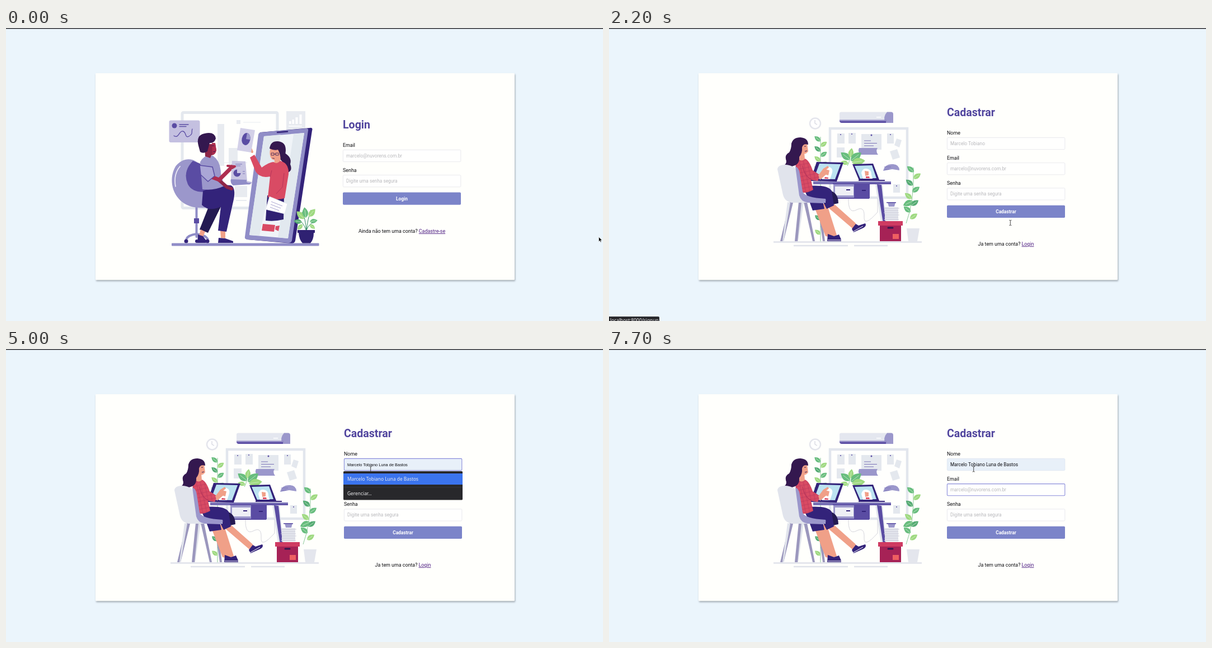
An HTML page that plays this animation: 1067x525 px, repeating every 8000 ms.

```html
<!DOCTYPE html>
<html lang="pt-BR">
<head>
<meta charset="utf-8">
<title>Login</title>
<style>
html, body { margin: 0; width: 100%; height: 100%; overflow: hidden; background: #ebf5fc; }
svg { display: block; }
text { font-family: Roboto, sans-serif; font-size: 8.89px; fill: #0c0c10; white-space: pre; }
.title { font-size: 19.56px; font-weight: 700; fill: #51459e; }
.input { font-size: 8.34px; }
.hint { font-size: 8.34px; fill: #b8b8bc; }
.action { font-size: 8.34px; font-weight: 700; fill: #fff; }
.link { fill: #4b1a80; text-decoration: underline; }
.box { fill: #fffffe; stroke: #e4e4ea; stroke-width: .8; }
.box.filled { fill: #e8f0f9; stroke: #dbe4f0; }
.box.focus { stroke: #8a8ddb; stroke-width: 1.1; }
.preview { font-family: "Liberation Sans", Arial, sans-serif; font-size: 7.41px; }
.menu text, #status text { font-family: "Noto Sans", sans-serif; font-size: 8.37px; fill: #ececee; }
.card { fill: #fffffc; filter: drop-shadow(1px 2px 1.5px rgba(30, 40, 50, .38)); }
.round { stroke-linecap: round; stroke-linejoin: round; }
</style>
</head>
<body>
<svg width="1067" height="525" viewBox="0 0 1067 525">
  <defs>
    <pattern id="plaid" width="7" height="7" patternUnits="userSpaceOnUse" patternTransform="rotate(-12)">
      <path fill="#d94b64" d="M0 0h7v7H0z"/><path stroke="#b8355a" stroke-width=".7" d="M0 3h7M3 0v7"/>
    </pattern>
  </defs>
  <path fill="#ebf5fc" d="M0 0h1067v525H0z"/>
  <path fill="#2b2b30" d="M0 0h1067v1.5H0z"/>
  <rect class="card" x="160" y="81" width="749" height="370.5" rx="1"/>

  <g id="login">
    <!-- wall board and charts -->
    <rect x="315" y="151.500" width="170" height="171" rx="2" fill="#fffffd" stroke="#e4e8ee" stroke-width="5"/>
    <path fill="#e8ebf0" d="M378 172h12v75h-12zM409 283h22v20h-22zM411 308h19v2h-19zM412 165h7v7h-7zM424 168.500h31v1h-31zM316 241h115v1H316zM398 215h16v40h-16zM501 149h34v42h-34z"/>
    <path fill="#fff" d="M506 167h3.500v5H506zM511.500 164h3.500v8h-3.500zM517.500 160h4v12h-4zM524.500 155h4v17h-4zM505 175h24v1.500h-24z"/>
    <rect x="291.500" y="165.500" width="55" height="39.500" rx="3" fill="#c4c0e0"/>
    <circle cx="301" cy="175" r="4.500" fill="#5a4ca3"/>
    <path class="round" fill="none" stroke="#5a4ca3" stroke-width="1.300" d="M310 173h16M310 176.500h12M300 193c9 6 9-9 16-8s3 13 11 9 4-9 6-13"/>
    <!-- phone -->
    <path fill="#33237a" d="M454 187 543 179Q549 178 547 184L517 381Q516 386 510 386L432 379Z"/>
    <path fill="#908dc7" d="M456 187 537 180Q541 180 540 184L511 381Q510 385 505 385L431 379Q426 378 427 374L451 191Q452 187 456 187Z"/>
    <path fill="#f0f4f8" d="m461 194 72-6-29 189-69-6z"/>
    <path fill="#e2e9ef" d="m461 194 30-3-38 181-18-1zM514 190l19-2-29 189-18-2z"/>
    <path class="round" stroke="#33237a" stroke-width="2.500" d="m485 187 18-1.500"/>
    <path fill="#d94b64" d="m459 351 22 2-2 12-22-2zm23 4 7-1-2 10-6-3z"/>
    <!-- caller -->
    <path fill="#34184f" d="M494 222q18 8 14 22 6 15-10 16 3-14-8-25z"/>
    <path fill="#2f2172" d="M467 300h30l-1 43q-16 4-32 2z"/>
    <path fill="#f0a088" d="M473 214q-4 14 2 21l5 2-1 7 11-2 2-25z"/>
    <path fill="#d94b64" d="M478 240q6 5 12-2 16 4 15 24l-7 43q-16 5-30-2l4-37q-18 4-26-9l-10-25 8-5 13 23q14-10 21-10z"/>
    <path fill="none" stroke="#b8355a" d="m475 255-3 12M497 260l-3 25-11 12"/>
    <path class="round" fill="none" stroke="#f0a088" stroke-width="4" d="m440 222-4-9"/>
    <path fill="#34184f" d="M471 216q2-14 15-13 14 1 14 16 0 13-9 17-1-12-5-18-7 2-15-2z"/>
    <path fill="none" stroke="#34184f" stroke-width=".8" d="M474 224h5v4h-5zm8 0h5v4h-5zm-3 2h3m-6 7 4 1"/>
    <path fill="#fff" stroke="#dfe3ec" stroke-width=".7" d="m471 302 32 13-5 18-34-8z"/>
    <path stroke="#a9a5cf" d="m474 311 20 8m-21-3 18 7m-19-2 16 6"/>
    <!-- papers -->
    <path fill="#d3d0e8" d="m419 179 26 4-7 40-25-4z"/>
    <ellipse cx="429" cy="199" rx="7.500" ry="11" transform="rotate(12 429 199)" fill="#5a4ca3"/>
    <path fill="#9b97cb" d="m429 199 2-11q7 3 5 12z"/>
    <!-- office chair -->
    <path class="round" fill="none" stroke="#8f8cc6" stroke-width="4" d="M340.500 322v52m-18 4q3-7 18-9 16 2 20 9"/>
    <path fill="#5a4ca3" d="M336 341h9v9h-9z"/>
    <g fill="#33237a"><circle cx="322" cy="382" r="3.500"/><circle cx="341" cy="382" r="3"/><circle cx="360" cy="382" r="3.500"/></g>
    <path fill="#9b97cb" d="M303 248C318 228 344 232 352 256L362 300Q400 300 396 312 385 324 345 322C300 320 287 275 303 248Z"/>
    <path fill="#5a4ca3" d="M334 238q-19 20-9 42 9 17 37 13l-10-48z"/>
    <path class="round" fill="none" stroke="#edecf7" stroke-width="1.700" d="M303 284q-4-22 8-36"/>
    <!-- seated man -->
    <path fill="#241a52" d="m365 313 24-3-28 57-15-6z"/>
    <path fill="#f0a088" d="m348 361 8 4-4 9-7-2zM383 362l9 1v14l-8-1z"/>
    <path fill="#33237a" d="m343 370 9 3 6 8-1 4h-15zM380 376l12 1 14 5v3h-27zM352 292q34-13 50-10 9 4 5 25l-13 58-15-2 5-43q-21 10-34-3z"/>
    <path fill="#9b97cb" d="M347 240q8-15 23-11 14 10 14 32l6 22q-19 9-39 6z"/>
    <path fill="none" stroke="#8e2547" stroke-width="6" class="round" d="m380 272 15 13 8 3"/>
    <path class="round" fill="none" stroke="#ae2d4f" stroke-width="7" d="m360 264 21 8 24-24"/>
    <path fill="#aaa6d6" stroke="#5a4ca3" stroke-width="1.500" d="m346 246 23 3 4 16-12 10-13-12z"/>
    <path fill="#c8c5e2" d="m404 238 24 1 3 35 9 2q-2 6-9 4l-26-1q-5-4-3-8z"/>
    <path fill="#908dc7" d="m402 271 28 1q-2 7 8 5l-2 3-30 2q-6-4-4-11z"/>
    <circle cx="413" cy="260" r="6.500" fill="#5a4ca3"/><path fill="#c8c5e2" d="M413 260v-7q7 1 7 7z"/>
    <path stroke="#7d76b8" d="M410 244h12m-11 3h8m4 10h4m-4 4h4"/>
    <path class="round" fill="none" stroke="#ae2d4f" stroke-width="4" d="m396 247 13 1-5 3"/>
    <path fill="#8e2547" d="M355 208h19l2 11q-2 9-9 9l-2 5-9-3z"/>
    <path fill="#ae2d4f" d="M368 206h6l2 13q-2 8-7 8z"/>
    <path fill="#34184f" d="M344 211q-5-19 11-22 18-4 20 9-3 9-11 8l-4 15q-7 5-13 1z"/>
    <path stroke="#34184f" d="M368 211h4m-2 11 4-1"/>
    <!-- floor and plant -->
    <rect x="296" y="385.500" width="263.500" height="5" rx="1" fill="#908dc7"/>
    <path fill="none" stroke="#2f8a62" d="M537 364q-2-25-8-34m8 34q2-22 8-38m-8 38q-6-18-16-21m16 19q5-12 14-14"/>
    <g id="potLeaves"></g>
    <path fill="#2f2172" d="M521 362h31v5h-2q0 12-6 18.500h-14q-6-6-7-18.500h-2z"/>
  </g>

  <g id="signup">
    <!-- air conditioner, clock, board -->
    <rect x="412" y="150.500" width="95" height="19" rx="3" fill="#e4e7ef"/>
    <path fill="#9b97cb" d="M497 150.500h7q4 0 4 4V170h-14q-5-11 3-19.500z"/>
    <path fill="#8f88c4" d="M412 164.500h84v3h-84z"/><path fill="#5a4ca3" d="M412 167h83v3h-79q-3 0-4-3z"/><path fill="#fff" d="M478 159h8v1.500h-8z"/>
    <circle cx="368.500" cy="171" r="9.500" fill="#fff" stroke="#e4e5ec" stroke-width="2.500"/>
    <path fill="none" stroke="#c9cad6" d="M368 165v6l4 2"/>
    <rect x="395" y="180" width="138" height="124" fill="#fffffd" stroke="#e2e6ed" stroke-width="4.500"/>
    <path fill="#e4e8ee" d="M408 189h13v18h-13zM428 188h13v19h-13zM451 190h36v28h-36zM497 189h12v18h-12zM514 198l9 3-4 13-9-4zM502 221l13-4 5 15-13 4zM508 280h12v15h-12zM407 214h14v18h-14z"/>
    <path fill="#9b97cb" d="M447 215h33q-4 6 1 12h-32q-5-5-2-12zM490 256q3-13 18-12 11 1 11 11l-13-2z"/>
    <path stroke="#7a72b6" d="M456 202h12m-12 4.500h23m-23 4.500h17M492 249h12m-11 4h8"/>
    <g fill="#5a4ca3"><circle cx="414" cy="191" r="1"/><circle cx="434" cy="190" r="1"/><circle cx="469" cy="192" r="1.500"/><circle cx="503" cy="191" r="1"/><circle cx="514" cy="283" r="1"/></g>
    <!-- plants -->
    <path fill="none" stroke="#6fba80" stroke-width=".8" d="M378 383V195M531 350q15-40 13-100M426 247q6-10 4-25"/>
    <g id="vineLeaves"></g>
    <!-- desk -->
    <path fill="none" stroke="#b9b9c6" stroke-width=".6" d="M428 304q-1 30 14 22t14 12 24-8V304"/>
    <path fill="#9b97cb" d="M401 280h39v24h-39z"/><path fill="#5a4ca3" d="M438 280h28v25h-28zM404 304h61v2h-61z"/>
    <path fill="#eeeff5" d="M404 284h33v16h-33z"/><path stroke="#33237a" stroke-width="2" d="M424 290h7m21 1h7"/>
    <path fill="#e2e5ed" d="m476 280 13 1 10 101h-8z"/><path fill="#5a4ca3" d="m479 280 8 1 11 101h-3z"/>
    <path fill="#7770b5" d="M365 275h139v5H365z"/><path fill="#5a4ca3" d="M400 278h104v2H400z"/>
    <path fill="#33237a" d="m371 240 48 1-12 34-47-1zM435 244l37-1 11 29-36 1zM446 272h47v2h-47z"/>
    <path fill="#bce3f1" d="m376 243 38 1-10 27-38-1zM439 247l31-1 8 23-29 1z"/>
    <g fill="#fff"><path d="m374 262 6 8h-8zM382 258q3-10 12-9 8 3 4 13l-3 9h-14zM451 260q2-9 9-8 9 1 9 11l2 7h-17z"/></g>
    <path fill="#f0a088" d="m386 253 8 2-2 9-7-2zM457 256l7 1v7l-6 1z"/>
    <path fill="#d94b64" d="m386 267 6 1v2h-7zM459 266h6l1 3h-7z"/>
    <!-- box, stack, bin -->
    <path fill="#9b97cb" d="M498 312h14l-2 8h-10z"/><path fill="#5a4ca3" d="M496 312h17v1.500h-17z"/>
    <path fill="#e4e6ed" d="M493 321h24v24h-24zM532 359h23l-4 23h-16z"/>
    <path stroke="#c4c4d2" stroke-width=".8" d="M492 323h27m-26 4h24m-26 4h27m-25 4h26m-27 4h25m-26 4h27"/>
    <path fill="#a62256" d="M484 352h38v30h-38z"/><path fill="#cf3b62" d="M481 346h44v8h-44z"/>
    <path class="round" stroke="#33174f" stroke-width="3" d="M499 358h8"/><path fill="#ee5f61" d="M507 369h11v9h-11z"/>
    <!-- seated woman and chair -->
    <path fill="#9b97bd" d="m323 312 6 1-17 69h-6zM348 312h6l14 70h-4zM372 312h5l9 70h-4z"/>
    <path fill="#e1e4ec" d="m319 312 5 1-12 69h-2zM343 312h5l-10 70h-4z"/>
    <path fill="#9b97bd" d="M339 312h5l-7 70h-5z"/>
    <path fill="#f0a088" d="m366 318 23-4 18 57-9 4-11-2zM392 322l11-6 37 33 4 6-9 4z"/>
    <path fill="#33237a" d="m391 369 11 4 9-3 4 9v3h-25zM434 360l7-9 5 3 12-4q3 4-3 8l-18 8z"/>
    <path stroke="#fff" d="M391 380h24m21-15 18-10"/>
    <path fill="#241a52" d="M378 290q32-3 32 24l-14 3z"/>
    <path fill="#33237a" d="M346 284q45-5 52 8l4 26-13 6-7-14 3 14-21 3-8-22z"/>
    <path fill="url(#plaid)" d="M333 238q9-9 17-4 8 3 14 21l14 9-5 10-12-2 4 18q-14 8-28 4z"/>
    <path class="round" fill="none" stroke="#b8355a" stroke-width="1.200" d="M346 247q3 18 15 24"/>
    <path fill="#f0a088" d="m374 264 9-12 8-5 2 3-5 4 4 5-15 13zM340 218l9 5 1 12q-6 5-11 0z"/>
    <path fill="#f0a088" d="M340 206q10-5 14 1l2 14q-6 8-13 2z"/>
    <path fill="#34184f" d="M326 207q3-11 16-11 14 1 14 13-9-3-11 5 1 10-5 17 1 13-10 16-9 4-17-1 6-4 3-11-2-8 6-12 4-6 4-16z"/>
    <path stroke="#34184f" d="M349 212h3m-2 9 4-1"/>
    <path fill="#e1e4ec" d="M301 253q1-8 14-8 19 1 22 15l5 35q4 12 45 13v5h-54q-18 1-22-14z"/>
    <path fill="#9b97cb" d="M333 248q7 3 8 13l5 32q4 11 41 13 2 6-4 8l-28-1q-12-2-15-13z"/>
    <!-- floor -->
    <path stroke="#e0e2ea" stroke-width="2.500" d="M294 383.500h265M330 390h97m11 0h60"/>
  </g>

  <g id="forms"></g>
  <path id="caret" stroke="#111" stroke-width=".8" d="M.5 202v10"/>
  <g id="menu" class="menu">
    <rect x="603" y="219" width="213" height="51.500" rx="1.500" fill="#28282b"/>
    <path id="pick" fill="#3b74ee" d="M603 223h213v20H603z"/>
    <path stroke="#3c3c40" stroke-width=".7" d="M603 248h213"/>
    <text id="option" x="610" y="236"></text><text x="610" y="262">Gerenciar…</text>
  </g>
  <g id="status">
    <path fill="#2a2a2e" d="M0 517h88q2 0 2 2v6H0z"/><text x="2" y="527">localhost:8000/signup</text>
  </g>
  <g id="cursor">
    <path id="arrow" stroke="#fff" stroke-width=".5" d="M0 0V8.200L1.900 6.500 3.200 9.400 4.500 8.800 3.200 6H5.800Z"/>
    <path id="hand" fill="#fff" stroke="#222" stroke-width=".8" d="M-2.500-4.500a1 1 0 0 1 2 0v4l4 .8q1.200.4 1 1.700l-.7 4h-5L-4.400 2q.3-1.300 1.900-.2z"/>
    <path id="ibeam" fill="none" stroke="#333" stroke-width=".9" d="M-2-4.700Q0-4.700 0-3.700V3.700Q0 4.700-2 4.700M2-4.700Q0-4.700 0-3.700M0 3.700Q0 4.700 2 4.700"/>
  </g>
</svg>
<script>
const $ = id => document.getElementById(id);
const show = (id, on) => $(id).style.display = on ? '' : 'none';
const GREENS = ['#68bd7e', '#9ed980', '#55ab74'];
const NAME = 'Marcelo Tobiano Luna de Bastos';
const HINTS = { Nome: 'Marcelo Tobiano', Email: 'marcelo@nuvorens.com.br', Senha: 'Digite uma senha segura' };

const leaf = (x, y, size, angle, i) =>
  `<path transform="translate(${x} ${y}) rotate(${angle}) scale(${size})" fill="${GREENS[i % 3]}"
    d="M0 0Q.4-.55 1 0 .4.55 0 0"/>
   <path transform="translate(${x} ${y}) rotate(${angle})" stroke="#e5f5dc" stroke-width=".6" d="M1 0H${size * .75}"/>`;

// Pairs of leaves up a stem
function vine(x, top, bottom, step, size, lean = 0) {
  let out = '';
  for (let y = top, i = 0; y < bottom; y += step, i++)
    out += leaf(x - lean * i, y, size, i % 2 ? -35 : -140, i);
  return out;
}

function form(prefix, x, top, title, labels, ask, link) {
  const rows = labels.map((label, i) => {
    const y = top + 33 + i * 45.2, id = prefix + label;
    return `<text x="${x}" y="${y}">${label}</text>
      <rect id="${id}Box" class="box" x="${x + .4}" y="${y + 5.4}" width="210.400" height="21.200" rx="1.500"/>
      <text id="${id}Hint" class="hint" x="${x + 6}" y="${y + 19}">${HINTS[label]}</text>
      <text id="${id}Text" class="input" x="${x + 6}" y="${y + 19}"></text>`;
  }).join('');
  const button = top + 33 + (labels.length - 1) * 45.2 + 36.4, mid = x + 105.5;
  return `<g id="${prefix}Form"><text class="title" x="${x}" y="${top}">${title}</text>${rows}
    <rect x="${x}" y="${button}" width="211" height="22.200" rx="1.800" fill="#7b84c9"/>
    <text class="action" text-anchor="middle" x="${mid}" y="${button + 14}">${title}</text>
    <text text-anchor="middle" x="${mid}" y="${button + 72.4}">${ask} <tspan class="link">${link}</tspan></text></g>`;
}

$('forms').innerHTML =
  form('in', 602, 180, 'Login', ['Email', 'Senha'], 'Ainda não tem uma conta?', 'Cadastre-se') +
  form('up', 604, 158, 'Cadastrar', ['Nome', 'Email', 'Senha'], 'Ja tem uma conta?', 'Login');
$('option').textContent = NAME;
$('potLeaves').innerHTML =
  leaf(533, 342, 19, -135, 1) + leaf(536, 340, 19, -98, 0) + leaf(541, 338, 18, -50, 1) +
  leaf(529, 348, 15, 190, 2) + leaf(543, 347, 14, -10, 0) + leaf(530, 352, 13, 135, 1) + leaf(543, 352, 12, 40, 1);
$('vineLeaves').innerHTML =
  vine(378, 203, 262, 9, 14) + vine(378, 318, 375, 13, 13) +
  vine(545, 258, 345, 12, 16, 1) + leaf(543, 310, 19, 155, 0) +
  leaf(431, 236, 21, -142, 0) + leaf(431, 232, 17, -80, 1) + leaf(432, 238, 24, -38, 0) +
  leaf(434, 241, 24, -8, 1) + leaf(428, 243, 14, 195, 1);

// Each track holds [time, ...values]; a value lasts until the next entry
const at = (track, t) => track.findLast(step => step[0] <= t);
const CURSOR = [
  [0, 'arrow', 1059.5, 374.5], [100, 'arrow', 1050, 377], [400, 'arrow', 1041, 377],
  [600, 'arrow', 975, 360], [700, 'arrow', 875, 338], [800, 'arrow', 795, 333], [900, 'arrow', 756, 344],
  [1100, 'arrow', 750.5, 376], [1300, 'arrow', 750, 374], [1400, 'hand', 750, 371], [1500, 'hand', 749.5, 369.5],
  [2100, 'arrow', 738, 360], [2200, 'ibeam', 717.3, 349], [2300, 'hand', 692, 329], [2400, 'ibeam', 668, 295],
  [2600, 'ibeam', 660, 258], [2700, 'ibeam', 653, 225], [2800, 'ibeam', 651.7, 215.3]
];
const TYPED = [[0, 0], [3800, 2], [4000, 3], [4200, 4], [4300, 5], [4400, 6], [5000, NAME.length]];
const MAIL = [[0, ''], [7000, 'm'], [7500, '']];
const CARET = [
  [0, ''], [3000, 'Nome'], [3400, ''], [3800, 'Nome'], [5000, ''], [5200, 'Nome'],
  [6000, ''], [6200, 'Email'], [6800, ''], [7000, 'Email'], [7700, '']
];

function setField(label, value) {
  $(`up${label}Text`).textContent = value;
  show(`up${label}Hint`, !value);
}

function draw() {
  const t = performance.now() % 8000;
  const signup = t >= 2100;
  for (const id of ['login', 'inForm']) show(id, !signup);
  for (const id of ['signup', 'upForm']) show(id, signup);
  show('status', t >= 1700 && t < 2600);
  show('menu', t >= 3000 && t < 5200);
  show('pick', t >= 4700);

  setField('Nome', NAME.slice(0, at(TYPED, t)[1]));
  setField('Email', at(MAIL, t)[1]);
  $('upNomeText').classList.toggle('preview', t >= 5000 && t < 5200);
  $('upNomeBox').classList.toggle('filled', t >= 5000);
  $('upNomeBox').classList.toggle('focus', t >= 3000 && t < 6000);
  $('upEmailBox').classList.toggle('focus', t >= 6000);

  const target = at(CARET, t)[1];
  show('caret', target);
  if (target) {
    const x = 610 + $(`up${target}Text`).getComputedTextLength();
    $('caret').setAttribute('transform', `translate(${x} ${target === 'Email' ? 45 : 0})`);
  }

  const [, kind, x, y] = at(CURSOR, t);
  for (const id of ['arrow', 'hand', 'ibeam']) show(id, id === kind);
  $('cursor').setAttribute('transform', `translate(${x} ${y})`);
  requestAnimationFrame(draw);
}
draw();
</script>
</body>
</html>
```
